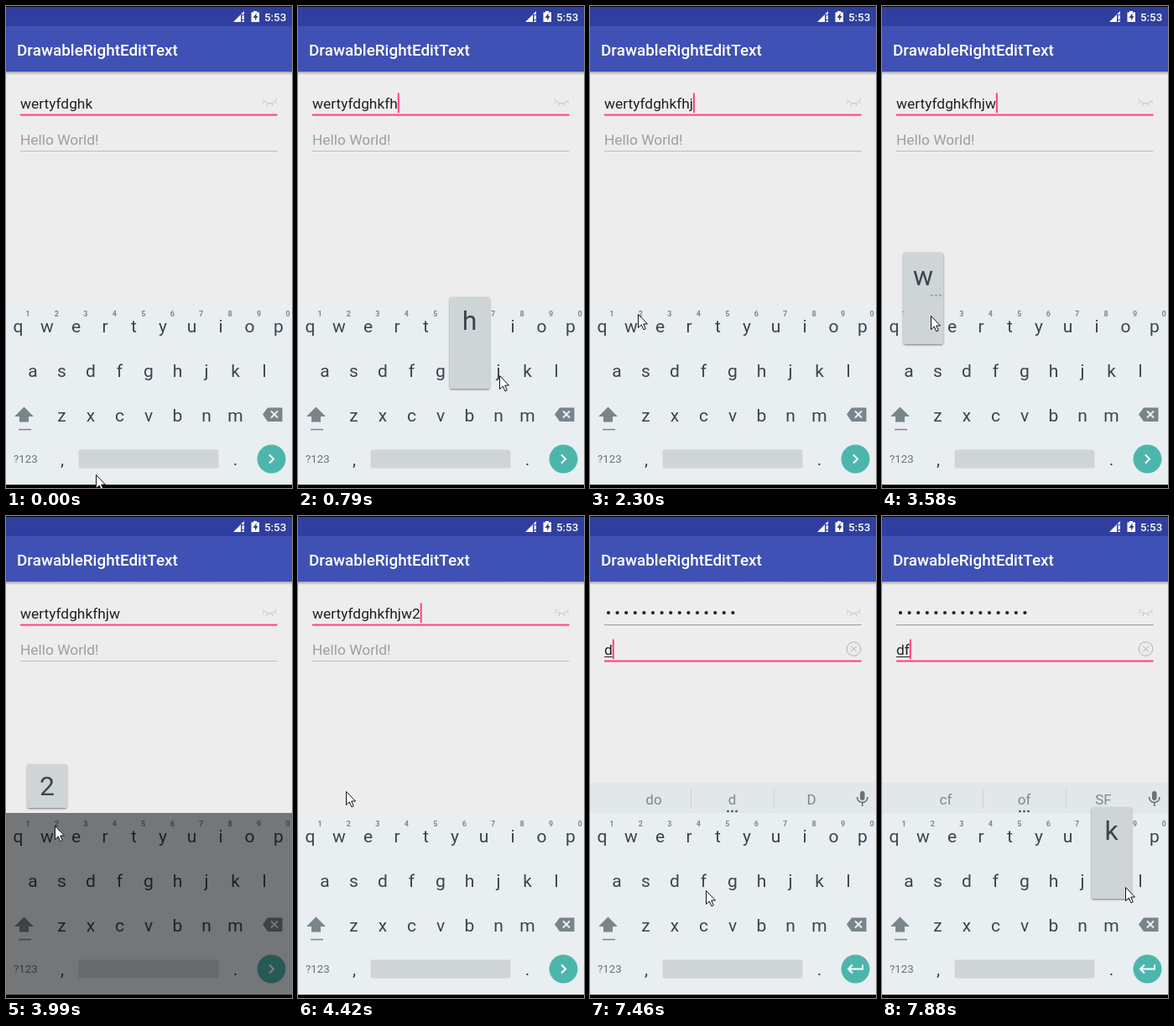
These frames come from a looping animation (341x573 px, 8 s). An HTML page:

```html
<!DOCTYPE html>
<html lang="en">
<head>
<meta charset="utf-8">
<title>Password field demo</title>
<style>
  html, body { margin: 0; width: 100%; height: 100%; overflow: hidden; background: #000; }
  svg { display: block; width: 341px; height: 573px; font-family: Roboto, sans-serif; }
  .key { font-size: 21px; fill: #37474f; text-anchor: middle; }
  .digit { font-size: 9px; font-weight: 700; fill: #7e898e; text-anchor: middle; }
  .field { font-size: 17.35px; fill: #212121; }
  .hint { fill: #9e9e9e; }
  .word { font-size: 17px; fill: #7d888d; text-anchor: middle; }
  .popup { font-size: 32px; fill: #37474f; text-anchor: middle; }
</style>
</head>
<body>
<svg viewBox="0 0 341 573">
  <defs>
    <linearGradient id="barShadow" x2="0" y2="1">
      <stop stop-color="#000" stop-opacity=".3"/>
      <stop offset="1" stop-color="#000" stop-opacity="0"/>
    </linearGradient>
    <filter id="lift" x="-20%" y="-10%" width="140%" height="120%">
      <feDropShadow dx="0" dy="1" stdDeviation=".8" flood-opacity=".5"/>
    </filter>
  </defs>
  <rect width="341" height="573"/>
  <rect y="1" width="341" height="568" fill="#ededed"/>
  <rect y="1" width="341" height="23" fill="#303f9f"/>
  <rect y="24" width="341" height="54" fill="#3f51b5"/>
  <rect y="78" width="341" height="4" fill="url(#barShadow)"/>
  <g fill="#fff" font-weight="500">
    <text x="13" y="59" font-size="18.9">DrawableRightEditText</text>
    <text x="308" y="18" font-size="13.3">5:53</text>
    <path d="M271 19L284 6V10H280V19Z"/>
    <path d="M281.5 11H284V16H281.5ZM281.5 17H284V19H281.5Z"/>
    <path d="M295 6H299V7.500H302V19H292.500V7.500H295Z"/>
    <path d="M298.500 8.500L294.500 14H297V17.500L300.500 12H298.500Z" fill="#303f9f"/>
  </g>
  <g id="fields"></g>
  <rect y="353" width="341" height="216" fill="#e9eef1"/>
  <g id="strip"></g>
  <g id="keys"></g>
  <g id="overlay"></g>
  <path id="pointer" d="M.5.5V16.500L4.300 13L6.900 18.800L9.300 17.700L6.700 12H11.500Z" fill="#fff" stroke="#111"/>
</svg>
<script>
const LOOP = 8000;
const PINK = '#ff4081';
const byId = id => document.getElementById(id);
const label = (x, y, cls, text) => `<text x="${x}" y="${y}" class="${cls}">${text}</text>`;
const line = (d, color, width = 1) => `<path d="${d}" fill="none" stroke="${color}" stroke-width="${width}"/>`;
const dots = (x, y, color) =>
  [0, 1, 2].map(i => `<circle cx="${x + i * 5}" cy="${y}" r="1.300" fill="${color}"/>`).join('');

// Keyboard rows: letters, centre of the first key, text baseline
const rows = [['qwertyuiop', 14.5, 388], ['asdfghjkl', 32, 441], ['zxcvbnm', 66.5, 493.5]];
const keyPos = {};
let keys = '';
for (const [letters, left, baseline] of rows) {
  [...letters].forEach((letter, i) => {
    const x = left + i * 34.5;
    keyPos[letter] = [x, baseline];
    keys += label(x, baseline, 'key', letter);
  });
}
for (let i = 0; i < 10; i++) keys += label(26 + i * 34.45, 369, 'digit', (i + 1) % 10);
keys += label(67, 546, 'key', ',') + label(273.5, 546, 'key', '.') +
  '<text x="9" y="543" font-size="13.3" fill="#66757c">?123</text>' +
  '<rect x="86.500" y="527.500" width="167" height="22" rx="2" fill="#cfd4d7"/>' +
  '<path d="M21.500 476.500L33 488H27V494.500H16V488H10Z" fill="#78868c"/>' +
  line('M15 503.500H30', '#78868c', 1.5) +
  '<path d="M306 485.500L312 477.500H329.500V494H312Z" fill="#78868c"/>' +
  line('M316 481.500L324 489.500M324 481.500L316 489.500', '#e9eef1', 2) +
  '<circle cx="316.500" cy="538.500" r="17" fill="#4db6ac"/>';
byId('keys').innerHTML = keys + '<path id="enter" fill="none" stroke="#fff" stroke-width="2"/>';

const ruler = document.createElement('canvas').getContext('2d');
function textWidth(text) {
  ruler.font = '17.35px Roboto, sans-serif';
  return ruler.measureText(text).width;
}

// Each step changes part of the state and holds until the next one
const base = 'wertyfdghk';
const steps = [
  [0, { x: 107, y: 557, first: base, second: '', masked: false, focus: 0, caret: false,
        key: '', dim: false, strip: false, words: [] }],
  [120, { x: 130, y: 500 }],
  [240, { x: 148, y: 437 }],
  [520, { key: 'f', first: base + 'f', caret: true }],
  [660, { x: 205, y: 438, key: 'h' }],
  [790, { x: 240, y: 439, first: base + 'fh' }],
  [910, { key: 'j' }],
  [1070, { x: 317, y: 425, key: '', first: base + 'fhj' }],
  [1200, { x: 250, y: 408 }],
  [1340, { x: 180, y: 390 }],
  [1480, { x: 120, y: 380 }],
  [1610, { x: 92, y: 374, caret: false }],
  [1740, { x: 72, y: 370 }],
  [1870, { x: 60, y: 367 }],
  [2000, { x: 57, y: 366, caret: true }],
  [2430, { key: 'w' }],
  [2570, { key: '', first: base + 'fhjw' }],
  [2970, { caret: false }],
  [3340, { caret: true }],
  [3460, { x: 58, y: 368, key: 'w' }],
  [3990, { key: '', dim: true, caret: false }],
  [4270, { x: 57, y: 340, dim: false, first: base + 'fhjw2', caret: true }],
  [4420, { y: 327 }],
  [4970, { x: 70, y: 305, caret: false }],
  [5100, { x: 125, y: 245 }],
  [5230, { x: 200, y: 180, caret: true }],
  [5370, { x: 265, y: 135 }],
  [5500, { x: 300, y: 117 }],
  [5640, { x: 312, y: 112 }],
  [5910, { masked: true }],
  [6060, { caret: false }],
  [6490, { x: 275, y: 148, caret: true }],
  [6620, { focus: 1 }],
  [6750, { x: 235, y: 245, strip: true }],
  [6890, { x: 160, y: 365 }],
  [7030, { x: 108, y: 430 }],
  [7160, { key: 'd' }],
  [7300, { key: '', second: 'd', words: ['do', 'd', 'D'] }],
  [7460, { x: 138, y: 445 }],
  [7610, { x: 142, y: 453, key: 'f', second: 'df', words: ['cf', 'of', 'SF'] }],
  [7750, { x: 220, y: 448, key: '' }],
  [7880, { x: 290, y: 441, key: 'k' }]
];

function drawField(text, index, state) {
  const focused = state.focus === index;
  const masked = state.masked && index === 0;
  let width = textWidth(text);
  let out = '';
  if (masked) {
    const pitch = 10.6;
    width = text.length * pitch - 1;
    [...text].forEach((_, i) => out += `<circle cx="${22 + i * pitch}" cy="115" r="2.100" fill="#212121"/>`);
  } else {
    out += label(17, 122, text ? 'field' : 'field hint', text || 'Hello World!');
  }
  if (index && text) out += line(`M17 124.500h${width}`, '#212121') +
    '<circle cx="314.500" cy="115" r="8.300" fill="none" stroke="#b0b0b0"/>' +
    line('M311 111.500l7 7m0-7l-7 7', '#b0b0b0');
  if (!index) out += line('M306 111Q314.500 121 323 111M308 114l-2 2M312 116l-1 3M317 116l1 3M321 114l2 2', '#c4c4c4');
  out += focused ? line('M17 129.500H323.500', PINK, 2)
                 : line('M17 129.500H323.500', text ? '#999' : '#bdbdbd');
  if (focused && state.caret) out += `<rect x="${17 + width}" y="103.500" width="2" height="23.500" fill="${PINK}"/>`;
  return `<g transform="translate(0 ${index * 43})">${out}</g>`;
}

function drawStrip({ strip, words }) {
  if (!strip) return '';
  return '<rect y="317" width="341" height="36" fill="#e2e7ea"/>' +
    line('M120.500 324V348M219.500 324V348', '#cdd3d6') +
    words.map((word, i) => label([76, 169.5, 264][i], 343, 'word', word)).join('') +
    (words.length ? dots(164.5, 351, '#37474f') : '') +
    '<rect x="322" y="327" width="5.500" height="11" rx="2.750" fill="#66757c"/>' +
    line('M318.500 334Q319 340.500 324.750 340.500T331 334M324.750 340V345', '#66757c', 1.7);
}

function drawOverlay({ key, dim }) {
  if (dim) return '<rect y="353" width="341" height="216" opacity=".5"/>' +
    '<rect x="25.500" y="295" width="47" height="52" rx="2" fill="#cfd4d7" filter="url(#lift)"/>' +
    label(49, 332, 'popup', '2');
  if (!key) return '';
  const [x, baseline] = keyPos[key];
  const top = baseline - 95;
  return `<rect x="${x - 23.5}" y="${top}" width="47.500" height="109" rx="2.500" fill="#cfd4d7" filter="url(#lift)"/>` +
    label(x, top + 39, 'popup', key) +
    (baseline < 400 ? dots(x + 10.5, top + 51, '#98a3a8') : '');
}

let shown = -1;
function frame(now) {
  const time = now % LOOP;
  const current = steps.filter(step => step[0] <= time);
  if (current.length !== shown) {
    shown = current.length;
    const state = Object.assign({}, ...current.map(step => step[1]));
    byId('fields').innerHTML = drawField(state.first, 0, state) + drawField(state.second, 1, state);
    byId('strip').innerHTML = drawStrip(state);
    byId('overlay').innerHTML = drawOverlay(state);
    byId('enter').setAttribute('d', state.focus
      ? 'M325 533.500V538.500H308.500M313 533.500L308 538.500L313 543.500'
      : 'M314 533.500L319 538.500L314 543.500');
    byId('pointer').setAttribute('transform', `translate(${state.x} ${state.y})`);
  }
  requestAnimationFrame(frame);
}
const start = performance.now();
const tick = () => frame(Math.max(0, performance.now() - start));
frame(0);
</script>
</body>
</html>
```
